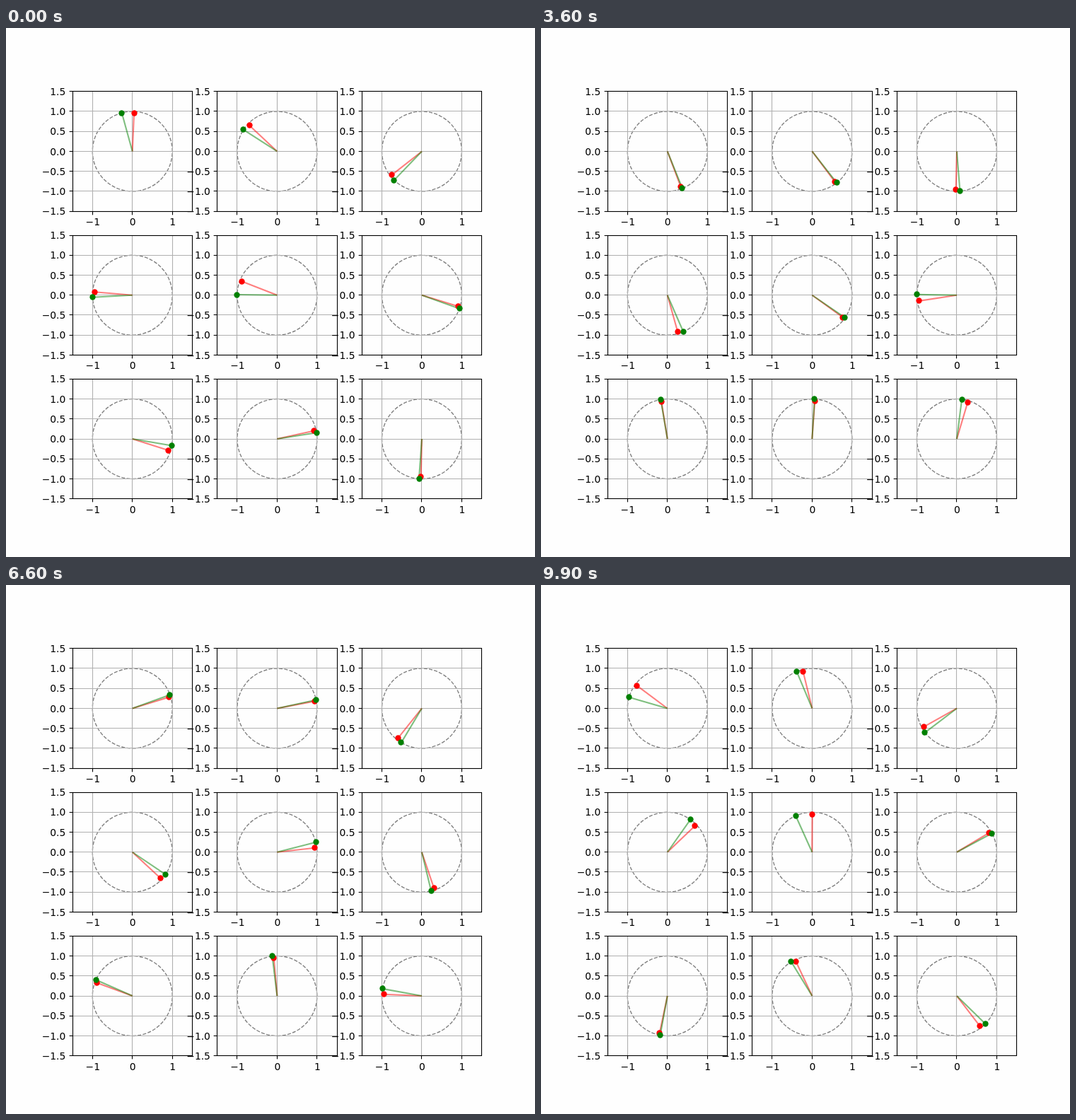
These frames come from a looping animation (748x748 px, 10000 ms). An HTML page with a canvas:

```html
<!DOCTYPE html>
<html lang="en">
<head>
<meta charset="utf-8">
<title>Nine phase dials</title>
<style>
html, body { margin: 0; width: 100%; height: 100%; overflow: hidden; background: #fefefe; }
canvas { display: block; }
</style>
</head>
<body>
<canvas id="stage" width="748" height="748"></canvas>
<script>
const ctx = document.getElementById('stage').getContext('2d');
const STEP = 100, STEPS = 100, RAD = Math.PI / 180;
const SIZE = 748 * 0.77 / 3.4, UNIT = SIZE / 3;
const RED_LENGTH = 0.95;

// Each dial turns steadily from start, with a slow bow and sway over the loop.
// The red hand leads the green one by an angle that swings once per turn.
// start, speed per step, bow, sway, lead, swing, peak (all in degrees)
const dials = [
  [105.4, 15.137, -1.4, 3.9, -10, 11, 330],
  [147.3, 14.196, 10, 0.9, -5.5, 5, 340],
  [226.1, 10.819, 21.3, -0.5, -3, 5, 40],
  [183.1, 13.249, -10, 3.3, -9, 2, 240],
  [179.3, 13.889, 2.9, 4.8, -13, 12, 309],
  [340.2, 15.029, 27.2, -9.1, 6, 3.6, 180],
  [350.4, 13.628, -20, -4.2, -2, 6, 175],
  [9, 12.045, 9.1, -5.9, -6, 10, 30],
  [266, 15.047, -7.9, 3, -3, 13, 202]
];

function anglesAt([start, speed, bow, sway, lead, swing, peak], t) {
  const u = Math.PI * t / (STEPS - 1);
  const green = start + speed * t + bow * Math.sin(u) + sway * Math.sin(2 * u);
  return { green, red: green + lead + swing * Math.cos((green - peak) * RAD) };
}

const snap = v => Math.floor(v) + 0.5;
const label = (v, digits) => v.toFixed(digits).replace('-', '\u2212');

function line(x1, y1, x2, y2, color, width) {
  ctx.strokeStyle = color;
  ctx.lineWidth = width;
  ctx.beginPath();
  ctx.moveTo(x1, y1);
  ctx.lineTo(x2, y2);
  ctx.stroke();
}

function drawCircle(cx, cy) {
  ctx.setLineDash([5.14, 2.22]);
  ctx.strokeStyle = '#808080';
  ctx.lineWidth = 1.39;
  ctx.beginPath();
  ctx.arc(cx, cy, UNIT, Math.PI / 2, -1.5 * Math.PI, true);
  ctx.stroke();
  ctx.setLineDash([]);
}

function drawGrid(cx, cy, left, top, right, bottom) {
  ctx.fillStyle = '#000';
  ctx.textAlign = 'center';
  for (let v = -1; v <= 1; v++) {
    const x = cx + v * UNIT;
    line(snap(x), top, snap(x), bottom, '#b0b0b0', 1.11);
    line(snap(x), bottom, snap(x), bottom + 4.86, '#000', 1.11);
    ctx.fillText(label(v, 0), x + 0.5, Math.round(cy + SIZE / 2 + 19.9));
  }
  ctx.textAlign = 'right';
  for (let v = -1.5; v <= 1.5; v += 0.5) {
    const y = cy - v * UNIT;
    line(left, snap(y), right, snap(y), '#b0b0b0', 1.11);
    line(left - 4.86, snap(y), left, snap(y), '#000', 1.11);
    ctx.fillText(label(v, 1), cx - SIZE / 2 - 9.7, Math.round(y + 5.1));
  }
}

function drawHands(cx, cy, hands) {
  const tips = hands.map(([angle, r, color]) => [
    cx + r * UNIT * Math.cos(angle * RAD),
    cy - r * UNIT * Math.sin(angle * RAD),
    color
  ]);
  ctx.globalAlpha = 0.5;
  for (const [x, y, color] of tips) line(cx, cy, x, y, color, 2.08);
  ctx.globalAlpha = 1;
  for (const [x, y, color] of tips) {
    ctx.fillStyle = color;
    ctx.beginPath();
    ctx.arc(snap(x), snap(y), 4.15, 0, 2 * Math.PI);
    ctx.fill();
  }
}

function drawDial(dial, cx, cy, t) {
  const left = snap(cx - SIZE / 2), right = snap(cx + SIZE / 2);
  const top = snap(cy - SIZE / 2), bottom = snap(cy + SIZE / 2);
  const { green, red } = anglesAt(dial, t);
  drawCircle(cx, cy);
  drawGrid(cx, cy, left, top, right, bottom);
  drawHands(cx, cy, [[red, RED_LENGTH, '#f00'], [green, 1, '#008000']]);
  ctx.strokeStyle = '#000';
  ctx.lineWidth = 1.11;
  ctx.strokeRect(left, top, right - left, bottom - top);
}

function draw(now) {
  const t = Math.floor(now / STEP) % STEPS;
  ctx.fillStyle = '#fefefe';
  ctx.fillRect(0, 0, 748, 748);
  ctx.font = '13.89px "DejaVu Sans", sans-serif';
  dials.forEach((dial, i) => {
    drawDial(dial, 178.75 + 204.6 * (i % 3), 174.46 + 203.28 * Math.floor(i / 3), t);
  });
}

const start = performance.now();
function tick() {
  draw(performance.now() - start);
  requestAnimationFrame(tick);
}
tick();
</script>
</body>
</html>
```
